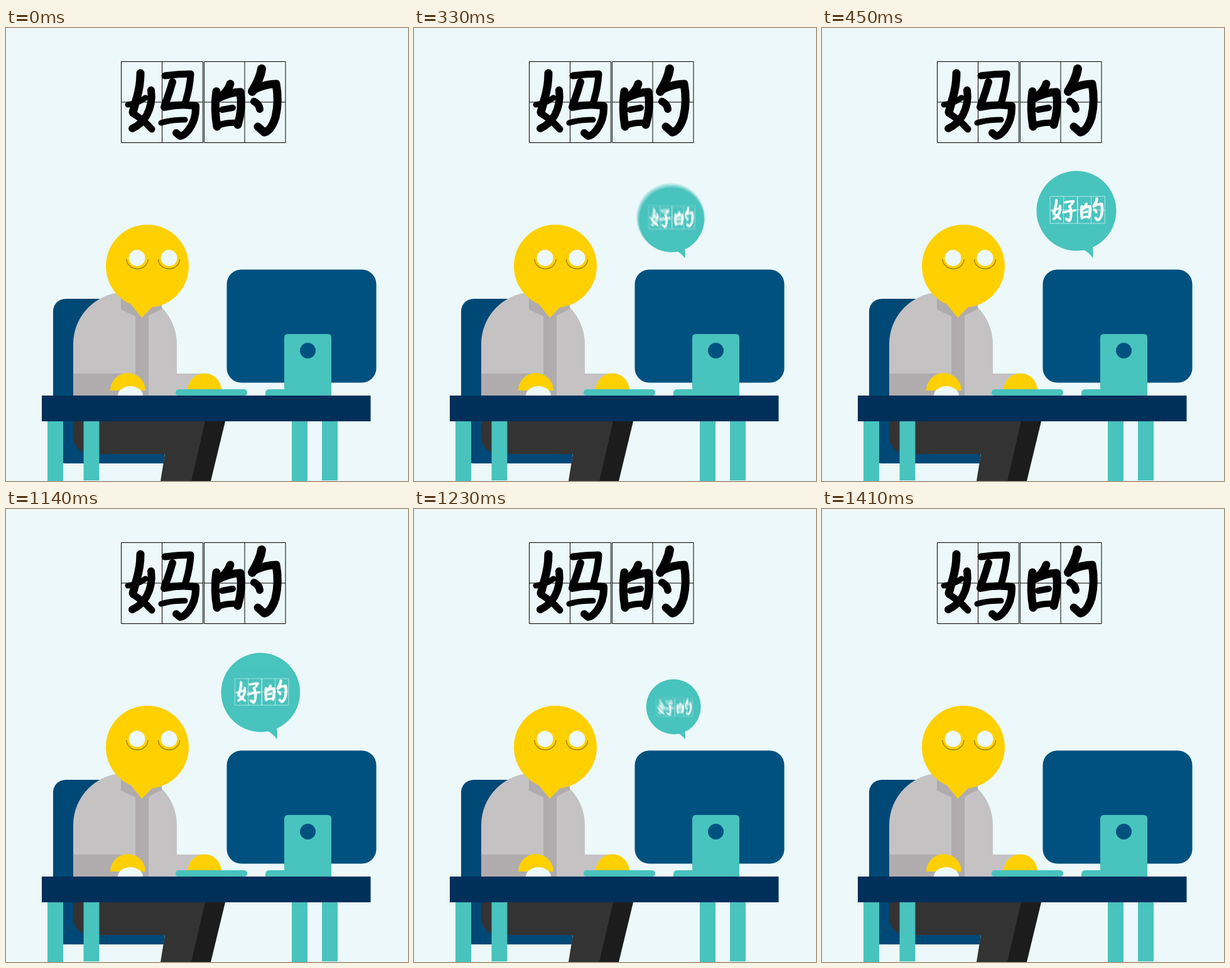
An HTML page that plays this animation: 640 px wide and 721 px high, repeating every 1.44 s.

```html
<!DOCTYPE html>
<html lang="zh">
<head>
<meta charset="utf-8">
<title>妈的 / 好的</title>
<style>
  html, body { margin: 0; width: 100%; height: 100%; overflow: hidden; background: #ecf8f9; }
  svg { display: block; width: 100%; height: 100%; }
  .brush path { fill: none; stroke-linecap: round; stroke-linejoin: round; stroke: currentColor; }
  .grid { fill: none; stroke: currentColor; }
  .teal { fill: #48c3be; }
  .navy { fill: #005180; }
  .skin { fill: #ffd000; }
  .shirt { fill: #c4c2c3; }
  .shade { fill: #b0acad; }
  .pale { fill: #ecf8f9; }
</style>
</head>
<body>
<svg viewBox="0 0 640 721">
  <defs>
    <path id="grid" d="M183.5 53.5H313.5V182.5H183.5ZM248.5 53.5V182.5M183.5 118H313.5M315.5 53.5H445V182.5H315.5ZM380 53.5V182.5M315.5 118H445"/>

    <!-- Brush lettering: each character part is a group of strokes -->
    <g id="woman" class="brush">
      <path stroke-width="13" d="M214 72Q214 92 208 112L202 134"/>
      <path stroke-width="11" d="M202 136Q218 145 232 161"/>
      <path stroke-width="9" d="M194 122Q208 121 222 111"/>
      <path stroke-width="12" d="M231 99Q234 120 224 139Q215 154 201 160"/>
    </g>
    <g id="horse" class="brush">
      <path stroke-width="11" d="M253 76Q273 73 294 73Q293 94 286 117"/>
      <path stroke-width="12" d="M265 86Q260 104 253 122"/>
      <path stroke-width="12" d="M252 126Q278 120 302 124Q303 146 291 162Q283 172 277 172L271 167"/>
      <path stroke-width="9" d="M247 151Q262 146 285 146"/>
    </g>
    <g id="child" class="brush">
      <path stroke-width="11" d="M256 82Q276 77 296 76Q290 90 276 101"/>
      <path stroke-width="13" d="M276 101Q287 122 283 148Q280 168 274 170L262 161"/>
      <path stroke-width="11" d="M247 130Q272 122 303 120"/>
    </g>
    <g id="of" class="brush">
      <path stroke-width="13" d="M357 89Q354 98 346 106"/>
      <path stroke-width="13" d="M335 101Q331 128 336 157"/>
      <path stroke-width="13" d="M337 112Q357 102 373 102Q377 128 369 154"/>
      <path stroke-width="10" d="M344 130L361 127M338 155Q352 150 368 151"/>
      <path stroke-width="14" d="M407 65Q405 80 392 101"/>
      <path stroke-width="13" d="M393 99Q412 89 430 89Q435 116 429 142Q422 164 411 166L401 157"/>
      <path stroke-width="12" d="M395 117Q403 121 404 129"/>
    </g>

    <g id="bubble">
      <circle class="teal" cx="405" cy="291" r="63.5"/>
      <path class="teal" d="M413 352Q424 355 431 366Q433 357 430 345Z"/>
      <g color="#fff" transform="translate(363 268) scale(.334) translate(-183.5 -53.5)">
        <use href="#grid" class="grid" stroke-width="2.4" opacity=".75"/>
        <use href="#woman"/><use href="#child"/><use href="#of"/>
      </g>
    </g>
  </defs>

  <rect class="pale" width="640" height="721"/>

  <g role="img" aria-label="妈的" color="#000">
    <use href="#grid" class="grid"/>
    <use href="#woman"/><use href="#horse"/><use href="#of"/>
  </g>

  <!-- Chair and trousers -->
  <path fill="#004876" d="M75 451A20 20 0 0 1 95 431H200V660H255L251 693H95A20 20 0 0 1 75 673Z"/>
  <path fill="#333" d="M107 626V651A27 27 0 0 0 134 678H253L246 721H297L320 626Z"/>
  <path fill="#1c1c1c" d="M317 626H349L326 721H295Z"/>

  <!-- Torso -->
  <path class="shirt" d="M107 585V503A82.5 82.5 0 0 1 272 503V550H316V585Z"/>
  <path class="shade" d="M183 430H248V447L227 458V585H206V459L183 448ZM107 550H194V585H107Z"/>

  <!-- Head -->
  <circle class="skin" cx="225" cy="379" r="66"/>
  <path class="skin" d="M196 436L216 461L236 441Z"/>
  <path fill="none" stroke="#a98b12" stroke-width="1.6" d="M192 368A17 15.5 0 0 0 226 368M242.5 368A17 15.5 0 0 0 276.5 368"/>
  <circle class="pale" cx="208.5" cy="366" r="13"/>
  <circle class="pale" cx="259.5" cy="366" r="13"/>

  <!-- Hands -->
  <path class="skin" d="M166 577A27.5 27.5 0 0 1 222 577ZM289 577A27 27.5 0 0 1 343 577Z"/>
  <path class="pale" d="M178 585A20 15 0 0 1 218 585Z"/>

  <!-- Monitor, keyboard and desk -->
  <rect class="navy" x="351.5" y="384.5" width="238" height="180" rx="23"/>
  <path class="teal" d="M443 585V493Q443 487 449 487H512Q518 487 518 493V585H413V581Q413 575 419 575H443Z"/>
  <circle class="navy" cx="480.5" cy="513.5" r="12.5"/>
  <rect class="teal" x="270" y="575" width="114" height="10.5" rx="5"/>
  <path class="teal" d="M66 626h25v95h-25ZM123.5 626h25v94h-25ZM455 626h25v95h-25ZM503 626h25v94h-25Z"/>
  <rect x="57" y="585" width="523.5" height="41" fill="#00305a"/>

  <g id="layers"></g>
</svg>
<script>
const LOOP = 1440, STEP = 30, SAMPLES = 8, SHUTTER = 14;
const SVG_NS = "http://www.w3.org/2000/svg";

// Each layer's opacity makes the stack an even average: a zoom blur.
const layers = Array.from({ length: SAMPLES }, (_, i) => {
  const layer = document.createElementNS(SVG_NS, "use");
  layer.setAttribute("href", "#bubble");
  layer.setAttribute("opacity", 1 / (i + 1));
  document.getElementById("layers").append(layer);
  return layer;
});

const ease = u => (1 - Math.cos(Math.PI * Math.min(1, Math.max(0, u)))) / 2;

// Pops up past full size, settles, then shrinks back to the tail's tip.
function bubbleScale(t) {
  if (t < 1100) return 1.04 * ease((t - 129) / 284) - 0.04 * ease((t - 405) / 40);
  return 1 - ease((t - 1114) / 290);
}

function draw(now) {
  const t = Math.floor((now % LOOP) / STEP) * STEP;
  const visible = t >= 180 && t < 1410;
  const still = t >= 450 && t < 1140;
  layers.forEach((layer, i) => {
    layer.style.display = visible && (!still || i === 0) ? "" : "none";
    const offset = still ? 0 : ((i + 0.5) / SAMPLES - 0.5) * SHUTTER;
    const scale = bubbleScale(t + offset);
    layer.setAttribute("transform", `translate(431 366) scale(${scale}) translate(-431 -366)`);
  });
}

const start = performance.now();
function tick() {
  draw(performance.now() - start);
  requestAnimationFrame(tick);
}
tick();
</script>
</body>
</html>
```
